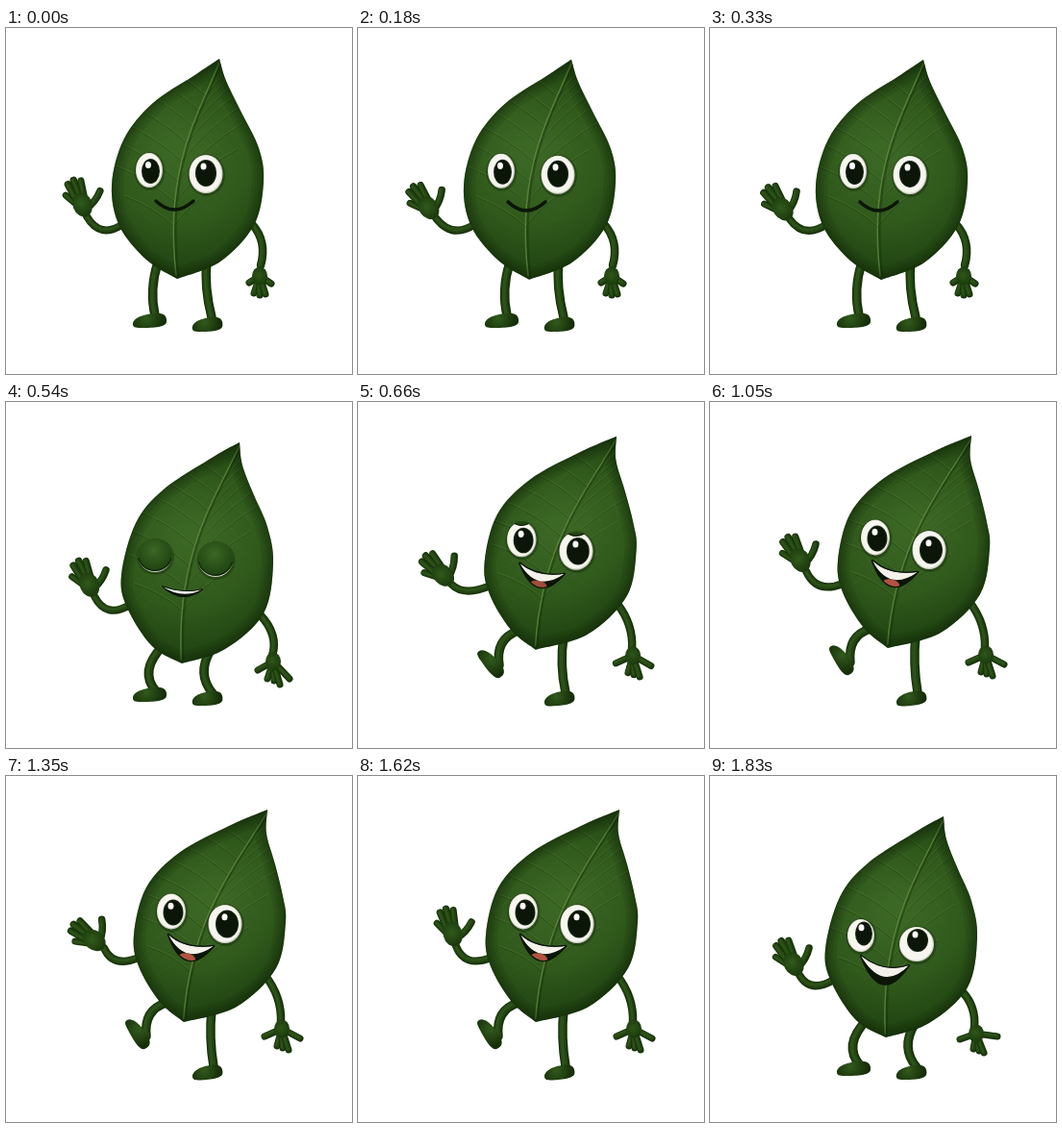
Recreate the animation shown at these times as an HTML page with a canvas. Size 360 by 360 pixels, loop 1860 ms.

```html
<!DOCTYPE html>
<html lang="en">
<head>
<meta charset="utf-8">
<title>Waving leaf</title>
<style>
html, body { margin: 0; width: 100%; height: 100%; overflow: hidden; background: #fff; }
canvas { display: block; width: 360px; height: 360px; }
</style>
</head>
<body>
<canvas id="stage" width="360" height="360"></canvas>
<script>
const ctx = document.getElementById('stage').getContext('2d');
const LOOP = 1860, STEP = 30, TAU = Math.PI * 2;
const INK = '#0b1508';

// leaf: tip, right side, base, left side.
// eyes: x, y, rx, ry, pupil x, y, rx, ry.  limbs: start, control, end.
// mouth: left corner, right corner, upper control, lower control.
const stand = {
  leaf: [222,32, 229,55, 244,86, 263,125, 268,160, 258,205, 223,243, 178,261,
         146,241, 118,206, 110,163, 123,115, 153,78, 195,50],
  eyeL: [149,148,14,18, 150.5,149,9.5,13], eyeR: [208,152,17.5,20, 208,151,11,14],
  lid: 0, tongue: 0, lip: 3.5,
  mouth: [156,180, 195,180, 175,198, 175,198],
  armL: [122,204, 98,220], armR: [256,204, 272,222, 265,247],
  palm: [264,258], tips: [253,265, 258,276, 264,278, 270,277, 276,266],
  legL: [158,244, 149,272, 155,299], legR: [209,241, 206,270, 214,301],
  footL: [150,304,0], footR: [210,308,0]
};
const crouch = {
  leaf: [243,42, 246,66, 258,97, 272,130, 278,168, 268,220, 228,257, 183,272,
         152,254, 126,214, 120,180, 135,126, 164,91, 216,57],
  eyeL: [155,160,17.5,17, 156,161,10,12], eyeR: [218,164,18,18, 219,165,11,12],
  lid: 0.95, tongue: 0, lip: 1.6,
  mouth: [163,192, 204,195, 184,200, 183,211],
  armL: [129,211, 104,226], armR: [264,221, 284,242, 277,264],
  palm: [278,270], tips: [262,279, 272,288, 279,290, 285,294, 295,288],
  legL: [163,254, 138,280, 156,301], legR: [213,258, 198,283, 215,303],
  footL: [150,304,0], footR: [210,308,0]
};
const kick = {
  leaf: [272,35, 271,60, 280,92, 288,125, 291,152, 281,200, 240,240, 185,256,
         160,235, 138,198, 133,165, 146,116, 180,80, 232,52],
  eyeL: [172,141,15,18.5, 174,142,10.5,13.5], eyeR: [228,154,17.5,20, 230,154,12,14.5],
  lid: 0, tongue: 1, lip: 2.6,
  mouth: [169,165, 216,177, 186,181, 186,212],
  armL: [138,189, 111,200], armR: [270,208, 287,230, 286,256],
  palm: [287,263], tips: [269,271, 282,281, 288,283, 294,285, 306,273],
  legL: [167,236, 143,243, 146,271], legR: [214,243, 211,272, 216,302],
  footL: [138,268,62], footR: [210,308,-3]
};
const grin = {
  ...crouch,
  eyeL: [157,166,14,17, 160,164,9,12.5], eyeR: [215,175,18,18, 216,171,11,12],
  lid: 0, lip: 2.2,
  mouth: [157,187, 207,197, 181,206, 178,241],
  armL: [127,213, 104,226], armR: [263,225, 277,240, 275,262],
  palm: [277,268], tips: [260,274, 274,284, 280,286, 285,288, 299,271]
};

const POSES = [[0, stand], [390, stand], [540, crouch], [690, kick], [1650, kick], [1830, grin]];
// wrist x, y and hand angle in degrees
const WAVE = [
  [0, [84,196,-20]], [260, [80,198,-40]], [330, [83,199,-34]], [540, [92,202,-24]],
  [770, [102,179,-58]], [810, [103,179,-54]], [1050, [100,176,-28]],
  [1310, [102,179,-54]], [1620, [102,177,-15]], [1830, [93,207,-28]]
];

const mix = (a, b, k) => {
  if (typeof a === 'number') return a + (b - a) * k;
  if (Array.isArray(a)) return a.map((v, i) => mix(v, b[i], k));
  return Object.fromEntries(Object.keys(a).map(n => [n, mix(a[n], b[n], k)]));
};
const ease = k => k * k * (3 - 2 * k);

function sample(track, t) {
  let i = 0;
  while (i < track.length - 2 && t >= track[i + 1][0]) i++;
  const [t0, a] = track[i], [t1, b] = track[i + 1];
  return mix(a, b, ease(Math.min(1, (t - t0) / (t1 - t0))));
}

function oval(x, y, rx, ry, fill, turn = 0) {
  ctx.beginPath();
  ctx.ellipse(x, y, rx, ry, turn, 0, TAU);
  ctx.fillStyle = fill;
  ctx.fill();
}

// Rounded limb, shaded from a dark rim to a lit core
function tube(p, width) {
  ctx.lineCap = 'round';
  const layers = [['#173009', 1, 0], ['#21430f', 0.72, 0.4], ['#2c5119', 0.36, 0.9]];
  for (const [color, part, shift] of layers) {
    ctx.beginPath();
    ctx.moveTo(p[0] - shift, p[1] - shift);
    if (p.length > 4) ctx.quadraticCurveTo(p[2] - shift, p[3] - shift, p[4] - shift, p[5] - shift);
    else ctx.lineTo(p[2] - shift, p[3] - shift);
    ctx.strokeStyle = color;
    ctx.lineWidth = width * part;
    ctx.stroke();
  }
}

function glow(x, y, r, inner, outer) {
  const g = ctx.createRadialGradient(x, y, 0, x, y, r);
  g.addColorStop(0, inner);
  g.addColorStop(1, outer);
  return g;
}

function foot([x, y, deg], size) {
  ctx.save();
  ctx.translate(x, y);
  ctx.rotate(deg * Math.PI / 180);
  ctx.scale(size, 1);
  ctx.beginPath();
  ctx.moveTo(-18, 4);
  ctx.bezierCurveTo(-18, -3, -4, -7, 6, -7);
  ctx.bezierCurveTo(14, -8, 18, -4, 17, 2);
  ctx.bezierCurveTo(16, 8, 0, 8, -10, 8);
  ctx.bezierCurveTo(-16, 8, -18, 7, -18, 4);
  ctx.fillStyle = glow(-4, -2, 19, '#315a1c', '#152d09');
  ctx.fill();
  ctx.restore();
}

function wavingHand([x, y, deg]) {
  ctx.save();
  ctx.translate(x, y);
  ctx.rotate(deg * Math.PI / 180);
  tube([-5, -14, -13, -28], 7);
  tube([-4, -17, -7, -38], 7.5);
  tube([1, -18, 0, -40], 7.5);
  tube([4, -16, 7, -37], 7);
  tube([3, -8, 14, -11, 22, -20], 7.5);
  oval(0, -13, 10, 13, glow(-1, -15, 13, '#315a1c', '#1c3b0d'));
  ctx.restore();
}

function restingHand([x, y], tips) {
  for (let i = 0; i < tips.length; i += 2) tube([x, y, tips[i], tips[i + 1]], 7);
  oval(x, y, 8, 9.5, glow(x - 1, y - 1, 10, '#2f561a', '#1c3b0d'));
}

// Catmull-Rom run through points i..j of a closed outline, with sharp ends
function run(path, pts, i, j) {
  const at = k => pts[Math.max(i, Math.min(j, k)) % pts.length];
  for (let k = i; k < j; k++) {
    const [a, b, c, d] = [at(k - 1), at(k), at(k + 1), at(k + 2)];
    path.bezierCurveTo(b[0] + (c[0] - a[0]) / 6, b[1] + (c[1] - a[1]) / 6,
      c[0] - (d[0] - b[0]) / 6, c[1] - (d[1] - b[1]) / 6, c[0], c[1]);
  }
}

const pairs = list => Array.from({ length: list.length / 2 }, (_, i) => [list[2 * i], list[2 * i + 1]]);

// Affine map that carries the standing leaf's axes onto the given leaf
function leafMap(pts) {
  const home = pairs(stand.leaf);
  const axes = q => [q[7][0] - q[0][0], q[7][1] - q[0][1], q[4][0] - q[10][0], q[4][1] - q[10][1]];
  const [ux, uy, vx, vy] = axes(home), [px, py, qx, qy] = axes(pts);
  const det = ux * vy - uy * vx;
  const a = (px * vy - qx * uy) / det, c = (qx * ux - px * vx) / det;
  const b = (py * vy - qy * uy) / det, d = (qy * ux - py * vx) / det;
  const [hx, hy] = home[0], [x, y] = pts[0];
  return [a, b, c, d, x - a * hx - c * hy, y - b * hx - d * hy];
}

const RIB = [222,36, 200,90, 164,145, 177,257];
function ribAt(t) {
  const s = 1 - t, w = [s * s * s, 3 * s * s * t, 3 * s * t * t, t * t * t];
  return [0, 1].map(o => w.reduce((sum, v, i) => sum + v * RIB[2 * i + o], 0));
}

function curve(x, y, cx, cy, ex, ey, color, width) {
  ctx.beginPath();
  ctx.moveTo(x, y);
  ctx.quadraticCurveTo(cx, cy, ex, ey);
  ctx.strokeStyle = color;
  ctx.lineWidth = width;
  ctx.stroke();
}

function veins() {
  const light = 'rgba(104,143,66,.34)', faint = 'rgba(104,143,66,.13)';
  for (let i = 0; i < 8; i++) {
    const t = 0.2 + i * 0.09, [x, y] = ribAt(t);
    const len = 22 + 58 * Math.sin(Math.PI * t);
    for (const side of [-1, 1]) {
      const rise = len * (side > 0 ? 0.85 : 0.6);
      const cx = x + side * len * 0.4, cy = y - rise * 0.62;
      const ex = x + side * len, ey = y - rise;
      curve(x, y + 1.3, cx, cy + 1.3, ex, ey + 1.3, 'rgba(14,38,6,.2)', 1.2);
      curve(x, y, cx, cy, ex, ey, light, 0.9);
      for (const k of [0.35, 0.55, 0.75]) {
        const bx = x + side * len * k, by = y - rise * k - 3;
        curve(bx, by, bx + side * 3, by + 9, bx + side * 13, by + 14, faint, 0.7);
      }
    }
  }
  const rib = (shift, color, width) => {
    ctx.beginPath();
    ctx.moveTo(RIB[0] + shift, RIB[1]);
    ctx.bezierCurveTo(...RIB.slice(2).map((v, i) => i % 2 ? v : v + shift));
    ctx.strokeStyle = color;
    ctx.lineWidth = width;
    ctx.stroke();
  };
  rib(2, 'rgba(13,36,6,.35)', 2.5);
  rib(0, 'rgba(101,145,64,.7)', 1.5);
}

function leaf(list) {
  const pts = pairs(list), shape = new Path2D();
  shape.moveTo(...pts[0]);
  run(shape, pts, 0, 7);
  run(shape, pts, 7, 14);
  shape.closePath();
  ctx.save();
  ctx.clip(shape);
  ctx.save();
  ctx.transform(...leafMap(pts));
  const g = ctx.createRadialGradient(180, 125, 8, 186, 145, 128);
  g.addColorStop(0, '#3c6825');
  g.addColorStop(0.5, '#30591c');
  g.addColorStop(1, '#1b3c0e');
  ctx.fillStyle = g;
  ctx.fillRect(60, 0, 260, 300);
  veins();
  ctx.restore();
  ctx.lineJoin = 'round';
  for (const w of [24, 17, 11, 6, 3]) {
    ctx.lineWidth = w;
    ctx.strokeStyle = 'rgba(10,30,4,.11)';
    ctx.stroke(shape);
  }
  ctx.restore();
}

function eye([x, y, rx, ry, px, py, prx, pry], lid) {
  oval(x + 0.5, y + 1, rx + 2, ry + 2, 'rgba(10,28,4,.32)');
  oval(x, y, rx, ry, '#d3d1c8');
  oval(x - 0.3, y - 0.4, rx - 0.9, ry - 0.9, '#f7f5f0');
  oval(px, py, prx, pry, '#1a2b12');
  oval(px, py, prx - 1, pry - 1, INK);
  oval(px - 2.5, py - pry * 0.5, 3, 3.6, '#fbfbf6');
  if (lid < 0.01) return;
  ctx.save();
  ctx.beginPath();
  ctx.ellipse(x, y, rx + 0.6, ry + 0.6, 0, 0, TAU);
  ctx.clip();
  const top = y - 2 * ry * (1 - lid);
  oval(x, top, rx + 0.6, ry + 0.6, glow(x - 1, top - 4, ry * 1.35, '#3b6724', '#1d400f'));
  ctx.strokeStyle = '#11240a';
  ctx.lineWidth = 1.3;
  ctx.beginPath();
  ctx.ellipse(x, top, rx, ry, 0, 0.25, Math.PI - 0.25);
  ctx.stroke();
  ctx.restore();
}

function mouth([lx, ly, rx, ry, ux, uy, dx, dy], lip, tongue) {
  const shape = (cx, cy) => {
    ctx.beginPath();
    ctx.moveTo(lx, ly);
    ctx.quadraticCurveTo(ux, uy, rx, ry);
    ctx.quadraticCurveTo(cx, cy, lx, ly);
    ctx.closePath();
  };
  ctx.lineJoin = ctx.lineCap = 'round';
  shape(dx, dy);
  ctx.fillStyle = ctx.strokeStyle = INK;
  ctx.lineWidth = lip;
  ctx.fill();
  ctx.stroke();
  if (dy - uy < 4) return;
  ctx.save();
  ctx.clip();
  const mx = (lx + rx) / 4 + dx / 2, my = (ly + ry) / 4 + dy / 2;
  ctx.globalAlpha = tongue;
  oval(mx - 1, my - 2, 9, 5, '#b3523f', 0.2);
  ctx.globalAlpha = 1;
  shape(mix(ux, dx, 0.55), mix(uy, dy, 0.55));
  ctx.fillStyle = '#f3f1ea';
  ctx.fill();
  ctx.restore();
}

function draw(t) {
  const p = sample(POSES, t), hand = sample(WAVE, t);
  const bob = t < 540 ? Math.sin(Math.PI * t / 540) : 0;
  ctx.fillStyle = '#fff';
  ctx.fillRect(0, 0, 360, 360);

  tube(p.legL, 9.5);
  tube(p.legR, 9.5);
  foot(p.footL, 1);
  foot(p.footR, 0.9);
  tube([...p.armL, hand[0], hand[1]], 8);
  wavingHand(hand);
  tube(p.armR, 8.5);
  restingHand(p.palm, p.tips);

  ctx.save();
  ctx.translate(0, bob);
  leaf(p.leaf);
  eye(p.eyeL, p.lid);
  eye(p.eyeR, p.lid);
  mouth(p.mouth, p.lip, p.tongue);
  ctx.restore();
}

const start = performance.now();
function tick() {
  const t = (performance.now() - start) % LOOP;
  draw(Math.floor(t / STEP) * STEP);
  requestAnimationFrame(tick);
}
tick();
</script>
</body>
</html>
```
